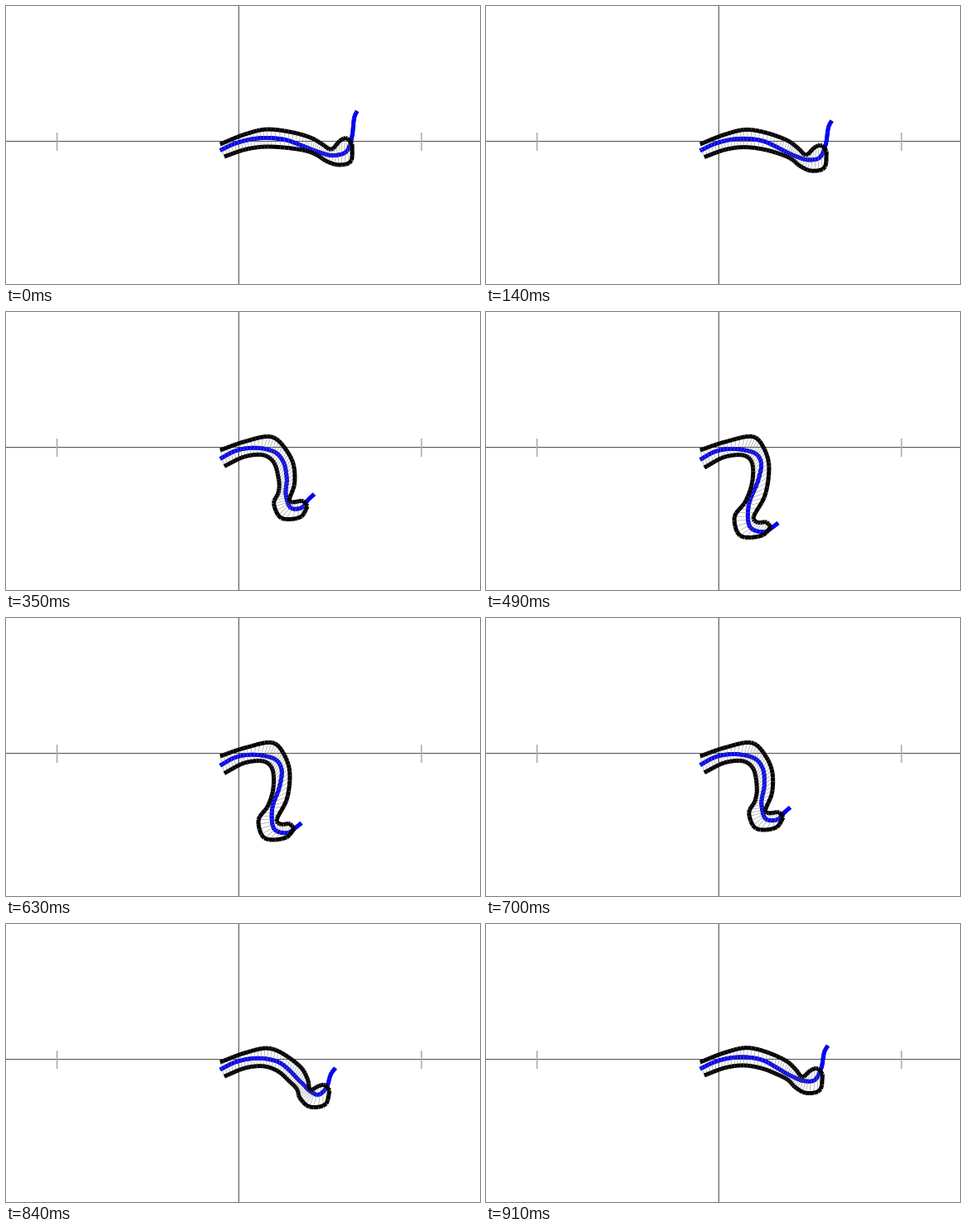
Animation, 571 px wide and 336 px high, one loop 0.98 s. Source, as a matplotlib script:

```python
import numpy as np
import matplotlib.pyplot as plt
from matplotlib.animation import FuncAnimation
from matplotlib.collections import LineCollection

W, H, DPI = 571, 336, 64
FRAMES, STEP = 14, 70
PX = 72 / DPI
ORIGIN = (280.5, 163.5)
UNIT = 219.5
PHASE, EASE = 0.68, 0.83
SAG = np.array([-5, 6])  # how far the middle swings out of its straight path

# Key points as (x, y) stretched followed by (x, y) curled.
UPPER = np.array([
    (258, 167, 258, 167), (288, 155, 288, 157), (317, 149, 323, 151),
    (344, 152.5, 335, 165), (368, 159.5, 341, 190), (381, 167, 336, 222),
    (393, 173, 322, 249), (402, 163, 328, 254.5), (411, 160, 338, 254),
    (417, 167, 343, 260)])

LOWER = np.array([
    (263, 182, 263, 188), (290, 173, 288, 175), (318, 170, 313, 174),
    (344, 172, 321, 184), (365, 176, 320, 209), (376, 181, 312, 230),
    (387, 188, 299, 250), (400, 192, 306, 270.5), (416, 187, 333, 270),
    (417, 167, 343, 260)])

CORE = np.array([
    (258, 174.5, 258, 178.5), (275, 166.5, 275, 169), (316, 159.5, 312, 167),
    (338, 162, 326, 172), (357, 169, 331.5, 182), (378, 177, 328, 203),
    (397, 180.5, 316, 236), (411, 175, 318, 260), (417, 157, 334, 266),
    (420, 133, 344, 261), (423, 127, 352, 255)])


def swing(k):
    """Eased cosine, 0 when stretched at the loop start, 1 half a loop on."""
    def eased(n):
        u = (1 - np.cos(2 * np.pi * (n - PHASE) / FRAMES)) / 2
        return u ** EASE
    low, high = eased(0), eased(FRAMES / 2)
    return (eased(k) - low) / (high - low)


def arc_knots(*curves):
    """Shared parameter from 0 to 1 following the mean chord lengths."""
    chords = [np.hypot(d[:, ::2], d[:, 1::2]).mean(axis=1)
              for d in (np.diff(c, axis=0) for c in curves)]
    total = np.concatenate([[0], np.cumsum(np.mean(chords, axis=0))])
    return total / total[-1]


def spline(x, knots, points):
    slopes = np.gradient(points, knots, axis=0)
    i = np.clip(np.searchsorted(knots, x) - 1, 0, len(knots) - 2)
    h = (knots[i + 1] - knots[i])[:, None]
    t = (x - knots[i])[:, None] / h
    return ((1 + 2 * t) * (1 - t) ** 2 * points[i]
            + t * (1 - t) ** 2 * h * slopes[i]
            + t ** 2 * (3 - 2 * t) * points[i + 1]
            + t ** 2 * (t - 1) * h * slopes[i + 1])


def bend(v, keys, knots, t, sag):
    points = (1 - v) * keys[:, :2] + v * keys[:, 2:]
    bump = 4 * v * (1 - v) * np.exp(-((t - 0.5) / 0.15) ** 2)
    return spline(t, knots, points) + sag * bump[:, None] * SAG


def links(points):
    return np.stack([points[:-1], points[1:]], axis=1)


SKIN_KNOTS = arc_knots(UPPER, LOWER)
CORE_KNOTS = arc_knots(CORE)
SKIN_T = np.linspace(0, 1, 47)
CORE_T = np.linspace(0, 1, 53)

fig = plt.figure(figsize=(W / DPI, H / DPI), dpi=DPI, facecolor="white")
ax = fig.add_axes([0, 0, 1, 1])
ax.set_xlim(0, W)
ax.set_ylim(H, 0)
ax.axis("off")


def rule(xs, ys, color, width):
    ax.plot(xs, ys, color=color, lw=width * PX, zorder=1, snap=False,
            solid_capstyle="butt")


def strokes(color, width, z):
    lines = LineCollection([], colors=color, linewidths=width * PX,
                           capstyle="butt", zorder=z)
    return ax.add_collection(lines, autolim=False)


cx, cy = ORIGIN
rule([0, W], [cy, cy], "#505050", 1)
rule([cx, cx], [0, H], "#505050", 1)
for side in (-1, 1):
    x = cx + 0.5 + side * UNIT
    rule([x, x], [cy - 10.5, cy + 11.5], "#aaaaaa", 1.6)

seams = strokes("#000000", 4.6, 2)
core = strokes("#0000ff", 5, 3)
rungs = strokes("#808080", 0.5, 4)
skin = strokes("#000000", 5, 5)


def update(k):
    v = swing(k)
    up = bend(v, UPPER, SKIN_KNOTS, SKIN_T, 0.6)
    low = bend(v, LOWER, SKIN_KNOTS, SKIN_T, 1)
    mid = links(bend(v, CORE, CORE_KNOTS, CORE_T, 1))
    seams.set_segments(mid)
    core.set_segments(mid)
    rungs.set_segments(np.stack([up, low], axis=1))
    skin.set_segments(np.concatenate([links(up), links(low)]))
    return seams, core, rungs, skin


anim = FuncAnimation(fig, update, frames=FRAMES, interval=STEP,
                     repeat=True, repeat_delay=0)
plt.show()
```
